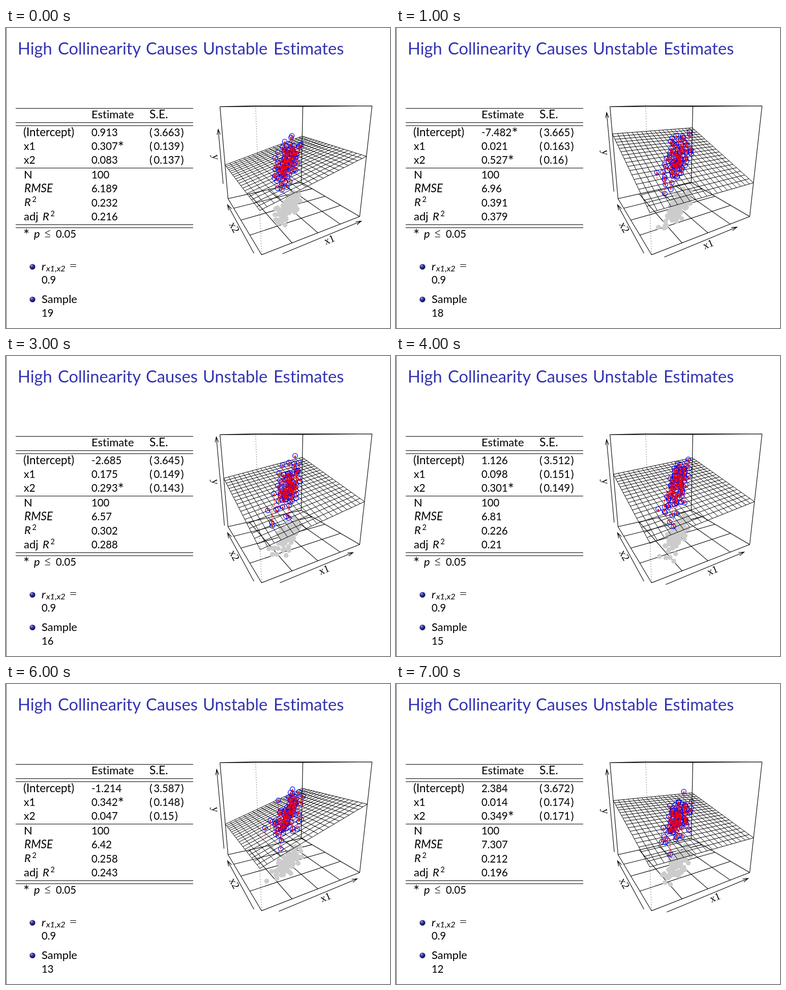
Animation, 755 px wide and 588 px high, one loop 8000 ms. Source, as an HTML page:

```html
<!DOCTYPE html>
<html lang="en">
<head>
<meta charset="utf-8">
<title>High Collinearity Causes Unstable Estimates</title>
<style>
  html, body { margin: 0; width: 100%; height: 100%; overflow: hidden; background: #fff; }
  svg { display: block; width: 755px; height: 588px; font-family: Lato, "Open Sans", sans-serif; font-variant-ligatures: none; }
  .title { fill: #3333b3; font-size: 32.7px; }
  .serif { font-family: "Liberation Serif", serif; font-size: 20.5px; text-anchor: middle; }
  .it { font-style: italic; }
  .thin { font-weight: 300; }
  .line { stroke: #000; stroke-width: 1.1; fill: none; }
  .plane { stroke: #000; stroke-width: 1; fill: none; }
  .dots { stroke: #000; stroke-width: 1; stroke-dasharray: 1 4; fill: none; }
  .obs { stroke: #00f; stroke-width: 1.3; fill: none; }
  .res { stroke: #f00; stroke-width: 1.1; fill: none; }
</style>
</head>
<body>
<svg viewBox="0 0 755 588">
  <defs>
    <radialGradient id="ball" cx=".36" cy=".32" r=".75">
      <stop offset="0" stop-color="#c8c8f4"/>
      <stop offset=".25" stop-color="#4a4ab8"/>
      <stop offset=".65" stop-color="#1c1c78"/>
      <stop offset="1" stop-color="#0a0a38"/>
    </radialGradient>
  </defs>
  <rect width="755" height="588" fill="#fff"/>
  <rect width="1" height="588" fill="#555"/>
  <g id="fixed"></g>
  <g id="plot" transform="translate(.5 .5)"></g>
  <g id="values"></g>
</svg>
<script>
const HOLD = 1000, FIRST = 19, CASES = 100, LINES = 20;

// est and se: intercept, x1, x2; fit: RMSE, R², adjusted R²
// plane: heights at the front, right and left corners; y, x1: arrow extents
const samples = [
  { est: '0.913 0.307 0.083', se: '3.663 0.139 0.137', fit: '6.189 0.232 0.216',
    plane: [.345, .583, .396], y: [305, 198], x1: [543, 698] },
  { est: '-7.482 0.021 0.527', se: '3.665 0.163 0.16', fit: '6.96 0.391 0.379',
    plane: [.329, .339, .73], y: [320, 165], x1: [527, 670] },
  { est: '1.808 0.077 0.262', se: '4.335 0.144 0.148', fit: '7.02 0.148 0.131',
    plane: [.275, .353, .486], y: [312, 211], x1: [509, 688] },
  { est: '-2.685 0.175 0.293', se: '3.645 0.149 0.143', fit: '6.57 0.302 0.288',
    plane: [.262, .425, .558], y: [332, 158], x1: [538, 682] },
  { est: '1.126 0.098 0.301', se: '3.512 0.151 0.149', fit: '6.81 0.226 0.21',
    plane: [.31, .425, .6], y: [326, 163], x1: [530, 684] },
  { est: '3.681 -0.038 0.362', se: '3.419 0.153 0.152', fit: '6.73 0.211 0.195',
    plane: [.375, .334, .756], y: [327, 196], x1: [526, 677] },
  { est: '-1.214 0.342 0.047', se: '3.587 0.148 0.15', fit: '6.42 0.258 0.243',
    plane: [.33, .654, .36], y: [322, 167], x1: [536, 690] },
  { est: '2.384 0.014 0.349', se: '3.672 0.174 0.171', fit: '7.307 0.212 0.196',
    plane: [.341, .348, .618], y: [329, 167], x1: [532, 692] }
];

// Perspective view of the unit box: u along x1, v along x2, h upwards
function project(u, v, h) {
  const w = 1 + .347 * u + .617 * v - .195 * h;
  return [(502 + 434 * u + 203 * v - 107.5 * h) / w, (444 + 53 * u + 96 * v - 321.6 * h) / w];
}

const xy = p => p[0].toFixed(1) + ' ' + p[1].toFixed(1);
const poly = pts => 'M' + pts.map(xy).join('L');
const path = (cls, d, more = '') => `<path class="${cls}" d="${d}" ${more}/>`;
const circle = (p, r) => `<circle cx="${p[0].toFixed(1)}" cy="${p[1].toFixed(1)}" r="${r}"/>`;
const text = (x, y, s, size = 22, cls = '') =>
  `<text x="${x}" y="${y}" class="${cls}"${size ? ` style="font-size:${size}px"` : ''}>${s}</text>`;
const num = (x, y, s) => text(x, y, s, 20.3);

function arrow(p, q, size, spread) {
  const ang = Math.atan2(q[1] - p[1], q[0] - p[0]);
  const leg = k => [q[0] - size * Math.cos(ang + k * spread), q[1] - size * Math.sin(ang + k * spread)];
  return { shaft: poly([p, q]), head: poly([leg(1), q, leg(-1)]) };
}

// Normal deviates, cut off at 2.4
function normal(seed) {
  const next = () => {
    seed = seed + 0x6D2B79F5 | 0;
    let t = Math.imul(seed ^ seed >>> 15, 1 | seed);
    t = t + Math.imul(t ^ t >>> 7, 61 | t) ^ t;
    return ((t ^ t >>> 14) >>> 0) / 4294967296;
  };
  return () => {
    const z = Math.sqrt(-2 * Math.log(1 - next())) * Math.cos(2 * Math.PI * next());
    return Math.max(-2.4, Math.min(2.4, z));
  };
}

function box() {
  let d = '';
  for (let k = 0; k <= 1; k += .25) {
    d += poly([project(k, 0, 0), project(k, 1, 0)]) + poly([project(0, k, 0), project(1, k, 0)]);
  }
  const ring = [[0, 0], [1, 0], [1, 1], [0, 1], [0, 0]];
  d += poly(ring.map(([u, v]) => project(u, v, 1)));
  for (const [u, v] of ring.slice(1, 4)) d += poly([project(u, v, 0), project(u, v, 1)]);
  return path('line', d) + path('dots', poly([project(0, 0, 1), project(0, 0, 0)]));
}

function axis(from, to, label, dx, dy) {
  const a = arrow(from, to, 11, .3);
  const mx = (from[0] + to[0]) / 2 + dx, my = (from[1] + to[1]) / 2 + dy;
  let deg = Math.atan2(to[1] - from[1], to[0] - from[0]) * 180 / Math.PI;
  if (Math.abs(deg) > 90) deg += 180;
  return path('line', a.shaft + a.head) +
    `<text class="serif" transform="translate(${mx} ${my}) rotate(${deg})" y="6">${label}</text>`;
}

function drawPlot(s, index) {
  const [front, right, left] = s.plane;
  const height = (u, v) => front + (right - front) * u + (left - front) * v;
  const on = (u, v) => project(u, v, height(u, v));
  let grid = '', shadows = '', rings = '', shafts = '', heads = '';
  for (let i = 0; i < LINES; i++) {
    const k = i / (LINES - 1);
    grid += poly([on(k, 0), on(k, 1)]) + poly([on(0, k), on(1, k)]);
  }
  // x1 and x2 correlate at 0.9
  const z = normal(index * 977 + 5);
  for (let i = 0; i < CASES; i++) {
    const z1 = z(), z2 = .9 * z1 + .436 * z();
    const u = .5 + .135 * z1, v = .5 + .135 * z2;
    const p = project(u, v, height(u, v) + .088 * z());
    const a = arrow(on(u, v), p, 5, .5);
    shadows += circle(project(u, v, 0), 4.8);
    rings += circle(p, 4.6);
    shafts += a.shaft;
    heads += a.head;
  }
  const yAt = y => [413 + (y - 158) * .092, y];
  const x1At = x => [x, 456 - (x - 509) * .4127];
  return box() + `<g fill="#ccc">${shadows}</g>` + path('plane', grid) +
    `<g class="obs">${rings}</g>` +
    path('res', shafts, 'stroke-dasharray="4 2 1 2"') + path('res', heads) +
    axis(...s.y.map(yAt), 'y', -10, 1) +
    axis(...s.x1.map(x1At), 'x1', 15, 5) +
    axis([487, 441], [435, 346], 'x2', -13, -3);
}

function drawValues(s, index) {
  const [est, se, fit] = [s.est, s.se, s.fit].map(list => list.split(' '));
  let out = num(70, 566, String(FIRST - index));
  est.forEach((b, i) => {
    const y = 212 + 27 * i;
    const star = Math.abs(b / se[i]) > 1.98 ? '<tspan font-size="29" dy="5">*</tspan>' : '';
    out += num(168, y, b + star) +
      text(282, y, `(<tspan x="290.5" font-size="20.3">${se[i]}</tspan><tspan dx="1.5">)</tspan>`);
  });
  fit.forEach((n, i) => out += num(168, 322 + 27.5 * i, n));
  return out;
}

function drawFixed() {
  const words = [[23, 'High'], [102, 'Collinearity'], [275, 'Causes'], [387, 'Unstable'], [526, 'Estimates']];
  const rules = [157, 185, 191, 274, 385, 391].map(y => `<rect x="19" y="${y}" width="349" height="1"/>`);
  const bullets = [468, 532].map(y => `<g fill="url(#ball)">${circle([52, y], 5.6)}</g>`);
  const rSquared = (x, y) => text(x, y, 'R', 22, 'it') + text(x + 15.5, y - 8, '2', 14.5);
  return words.map(([x, w]) => text(x, 52, w, 0, 'title')).join('') + rules.join('') + bullets.join('') +
    text(168, 177, 'Estimate') + text(282, 177, 'S.E.', 23) +
    text(34, 212, '(Intercept)', 22.3) + text(35, 239, 'x1', 21) + text(35, 266, 'x2', 21) +
    text(35, 295, 'N') + num(168, 295, '100') + text(36, 322, 'RMSE', 22.5, 'it') +
    rSquared(36, 349) + text(35, 377, 'adj') + rSquared(72, 377) +
    text(34, 416, '*', 29) + text(55, 411, 'p', 22, 'it') + text(74, 411, '≤', 27, 'thin') + num(98, 411, '0.05') +
    text(70, 475, 'r', 22, 'it') + text(79, 477, 'x1,x2', 16.3, 'it') + text(124, 475, '=', 28, 'thin') +
    num(70, 501, '0.9') + text(70, 539, 'Sample');
}

const el = id => document.getElementById(id);
el('fixed').innerHTML = drawFixed();
const scenes = samples.map((s, i) => [drawPlot(s, i), drawValues(s, i)]);
let shown = -1;

function show(ms) {
  const i = Math.floor(ms / HOLD) % scenes.length;
  if (i === shown) return;
  shown = i;
  [el('plot').innerHTML, el('values').innerHTML] = scenes[i];
}

const start = performance.now();
function tick(now) {
  show(Math.max(0, now - start));
  requestAnimationFrame(tick);
}
show(0);
requestAnimationFrame(tick);
</script>
</body>
</html>
```
